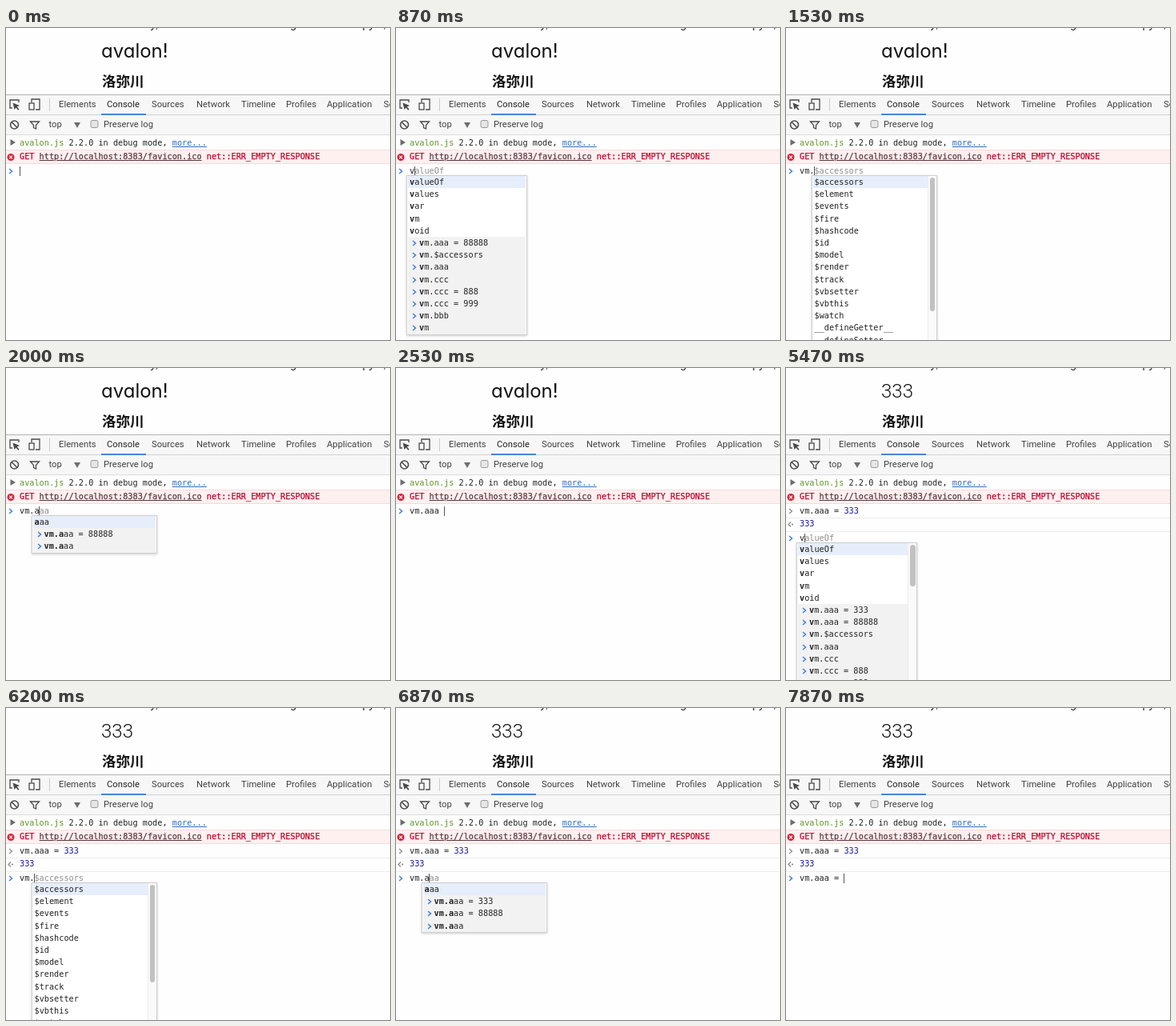
Animation of 480x390 px, one loop 8000 ms. Source, as an HTML page:

```html
<!DOCTYPE html>
<html lang="en">
<head>
<meta charset="utf-8">
<title>Console session</title>
<style>
  html, body { margin: 0; width: 100%; height: 100%; overflow: hidden; }
  #stage { position: relative; width: 480px; height: 390px; overflow: hidden; background: #fefefe; color: #222; }
  #stage div, #stage svg { position: absolute; }
  .ui { font: 11.25px/16px Roboto, sans-serif; color: #424242; white-space: pre; }
  .mono { font: 10.22px/16px "DejaVu Sans Mono", monospace; color: #222; white-space: pre; }
  .bar { left: 0; width: 480px; background: #f7f7f7; }
  .rule { left: 0; width: 480px; height: 1px; background: #ececec; }
  .intro { left: 119px; top: -14px; font: 14px/18px "Liberation Sans", sans-serif; white-space: pre; }
  #title { left: 119px; top: 14px; color: #111; }
  #title.word { font: 400 24px/30px Inter, sans-serif; font-feature-settings: "cv11"; font-optical-sizing: none; }
  #title.number { font: 300 24px/30px Roboto, sans-serif; }
  .subtitle { left: 120px; top: 53.5px; font: 700 17.5px/24px "Noto Sans CJK SC", "Noto Sans CJK", sans-serif; color: #111; }
  .error { left: 0; top: 152px; width: 480px; height: 16px; background: #fff0f0; border: solid #fbd9da; border-width: 1px 0; }
  .red { color: #c1052c; -webkit-text-stroke: .25px; }
  .num { color: #1a1a9c; }
  .link { text-decoration: underline; }
  #caret { width: 1px; height: 12px; background: #555; }
  .hint { color: #8d8d8d; }
  #popup { box-sizing: border-box; background: #fff; border: 1px solid #cfcfcf; box-shadow: 0 1px 3px #0003; overflow: hidden; }
  .row { left: 1px; height: 15.2px; line-height: 15.2px; padding-left: 2px; box-sizing: border-box; }
  .row.past { background: #f2f2f2; padding-left: 14px; }
  .row.on { background: #e6eefb; }
  .row svg { left: 5px; top: 4px; }
  .track { right: 0; top: 0; width: 11px; height: 100%; background: #fafafa; border-left: 1px solid #ececec; box-sizing: border-box; }
  .thumb { right: 1.5px; top: 1.5px; width: 6.5px; border-radius: 4px; background: #c1c1c1; }
</style>
</head>
<body>
<div id="stage">
  <div class="intro">in directory, but soon to be to be seeing are about to py it,</div>
  <div id="title"></div>
  <div class="subtitle">洛弥川</div>

  <div class="bar" style="top:83px;height:50px;border-top:1px solid #b4b4b4;box-sizing:border-box"></div>
  <div class="rule" style="top:108px;background:#d0d0d0"></div>
  <div class="rule" style="top:133px;background:#dcdcdc"></div>
  <div style="left:119px;top:107px;width:56px;height:2px;background:#4a84da"></div>
  <div id="tabs"></div>
  <div class="ui" style="left:53.5px;top:113px">top</div>
  <div class="ui" style="left:122px;top:113px">Preserve log</div>

  <svg width="130" height="60" style="left:0;top:80px" fill="none" stroke="#4a4a4a" stroke-width="1.3">
    <path d="M8 20H5V10H16V13"/>
    <path d="M8.5 13.5L17 17L13.8 18.4L16.5 21.8L15.2 22.8L12.5 19.5L10.5 22Z" fill="#4a4a4a" stroke="none"/>
    <path d="M32 13V9H42V22H37"/>
    <rect x="29" y="14" width="6" height="8"/>
    <path d="M54.5 8V24" stroke="#ccc" stroke-width="1"/>
    <circle cx="10.5" cy="41" r="5" stroke-width="1.6"/>
    <path d="M7 37.5L14 44.5" stroke-width="1.6"/>
    <path d="M30.5 37H41.5L37.5 41.5V46L34.5 44.5V41.5Z"/>
    <path d="M85 38H93L89 45Z" fill="#6e6e6e" stroke="none"/>
    <rect x="106" y="35.5" width="9" height="9" rx="2" fill="#e6e6e6" stroke="#999" stroke-width="1"/>
  </svg>

  <div class="mono" style="left:17px;top:136px"><span style="color:#5f9427">avalon.js</span> 2.2.0 in debug mode, <span class="link" style="color:#2f6fc0">more...</span></div>
  <div class="error"></div>
  <div class="mono red" style="left:17px;top:153px">GET <span class="link" style="color:#5b3a3e">http://localhost:8383/favicon.ico</span> net::ERR_EMPTY_RESPONSE</div>
  <svg width="14" height="40" style="left:0;top:136px">
    <path d="M5.5 3V11L12 7Z" fill="#6e6e6e"/>
    <circle cx="6" cy="25.5" r="4.5" fill="#d8253c"/>
    <path d="M4.2 23.7L7.8 27.3M7.8 23.7L4.2 27.3" stroke="#fff" stroke-width="1.2"/>
  </svg>

  <div id="result">
    <svg width="12" height="34" style="left:0;top:171px" fill="none" stroke="#8a8a8a" stroke-width="1.2">
      <path d="M4 5L7.5 8L4 11M6 21.5L3 24.5L6 27.5"/>
      <circle cx="8" cy="24.5" r=".5"/>
    </svg>
    <div class="mono" style="left:17px;top:171px">vm.aaa = <span class="num">333</span></div>
    <div class="rule" style="top:187px"></div>
    <div class="mono num" style="left:17px;top:187px">333</div>
    <div class="rule" style="top:204px"></div>
  </div>

  <svg id="prompt" width="12" height="16" style="left:0" fill="none" stroke="#3f7fe0" stroke-width="1.5"><path d="M4 5L7.5 8L4 11"/></svg>
  <div id="input" class="mono" style="left:17px"></div>
  <div id="caret" class="mono"></div>
  <div id="popup" class="mono"></div>
</div>

<script>
const LOOP = 8000, ENTER = 4330, ROW = 15.2;
const $ = id => document.getElementById(id);

// Each entry: time of the key press, text in the prompt after it
const keys = [
  [0, ''], [600, 'v'], [1130, 'vm'], [1330, 'vm.'],
  [1870, 'vm.a'], [2070, 'vm.aa'], [2200, 'vm.aaa'], [2400, 'vm.aaa '],
  [3000, 'vm.aaa ='], [3200, 'vm.aaa = '],
  [3730, 'vm.aaa = 3'], [3870, 'vm.aaa = 33'], [4040, 'vm.aaa = 333'],
  [ENTER, ''], [5000, 'v'], [6000, 'vm'], [6130, 'vm.'],
  [6800, 'vm.a'], [7000, 'vm.aa'], [7130, 'vm.aaa'], [7330, 'vm.aaa '],
  [7600, 'vm.aaa ='], [7730, 'vm.aaa = ']
];
const globals = ['valueOf', 'values', 'var', 'vm', 'void'];
const members = ('$accessors $element $events $fire $hashcode $id $model $render $track ' +
  '$vbsetter $vbthis $watch __defineGetter__ __defineSetter__ aaa').split(' ');
const past = ['vm.aaa = 88888', 'vm.$accessors', 'vm.aaa', 'vm.ccc', 'vm.ccc = 888', 'vm.ccc = 999', 'vm.bbb', 'vm'];
const chevron = '<svg width="6" height="8" fill="none" stroke="#3f7fe0" stroke-width="1.5"><path d="M1 1L4.5 4L1 7"/></svg>';

const tabs = { Elements: 66, Console: 126, Sources: 182, Network: 238, Timeline: 294, Profiles: 350, Application: 401, Security: 472 };
$('tabs').innerHTML = Object.entries(tabs).map(([name, x]) =>
  `<div class="ui" style="left:${x}px;top:88px${name === 'Console' ? ';color:#222' : ''}">${name}</div>`).join('');

function complete(text, entered) {
  if (!text || text.includes(' ')) return null;
  const dot = text.indexOf('.') + 1;
  const prefix = text.slice(dot);
  const names = (dot ? members : globals).filter(n => n.startsWith(prefix));
  const log = entered ? ['vm.aaa = 333', ...past] : past;
  const old = dot && !prefix ? [] : log.filter(h => h.startsWith(text) && h !== text);
  return { dot, prefix, names, old };
}

function drawPopup(list, text, top, entered) {
  const box = $('popup');
  box.style.display = list ? '' : 'none';
  if (!list) return;
  const { dot, prefix, names, old } = list;
  const count = names.length + old.length;
  const room = 390 - top;
  const scrolls = count * ROW > room - 6;
  const width = dot ? 157 : 151;
  const rowWidth = width - (scrolls ? 14 : 4);
  const row = (word, i, lead, cls, icon) =>
    `<div class="row ${cls}" style="top:${i * ROW}px;width:${rowWidth}px">${icon}<b>${word.slice(0, lead)}</b>${word.slice(lead)}</div>`;
  const thumb = dot ? (entered ? 122 : 167) : (entered ? 52 : 75);
  box.style.left = (dot ? 31.5 : 13) + 'px';
  box.style.top = top + 'px';
  box.style.width = width + 'px';
  box.style.height = (scrolls ? room + 4 : count * ROW + 2) + 'px';
  box.innerHTML =
    names.map((n, i) => row(n, i, prefix.length, i ? '' : 'on', '')).join('') +
    old.map((h, i) => row(h, names.length + i, text.length, 'past', chevron)).join('') +
    (scrolls ? `<div class="track"></div><div class="thumb" style="height:${thumb}px"></div>` : '');
}

function drawState(text, entered) {
  const y = entered ? 213 : 179;
  const list = complete(text, entered);
  const hint = list && list.names.length ? list.names[0].slice(list.prefix.length) : '';
  $('title').className = entered ? 'number' : 'word';
  $('title').textContent = entered ? '333' : 'avalon!';
  $('result').style.display = entered ? '' : 'none';
  $('prompt').style.top = $('input').style.top = y - 8 + 'px';
  $('input').innerHTML = `${text}<span class="hint">${text === 'vm' ? '' : hint}</span>`;
  $('caret').style.top = y - 6 + 'px';
  $('caret').style.left = `calc(16.5px + ${text.length}ch)`;
  drawPopup(list, text, y + 5, entered);
}

let shown = -1;
function frame() {
  const t = performance.now() % LOOP;
  const i = keys.findLastIndex(k => k[0] <= t);
  const [start, text] = keys[i];
  if (i !== shown) drawState(text, t >= ENTER);
  shown = i;
  $('caret').style.visibility = (t - start) % 1000 < 500 ? 'visible' : 'hidden';
  requestAnimationFrame(frame);
}
frame();
</script>
</body>
</html>
```
